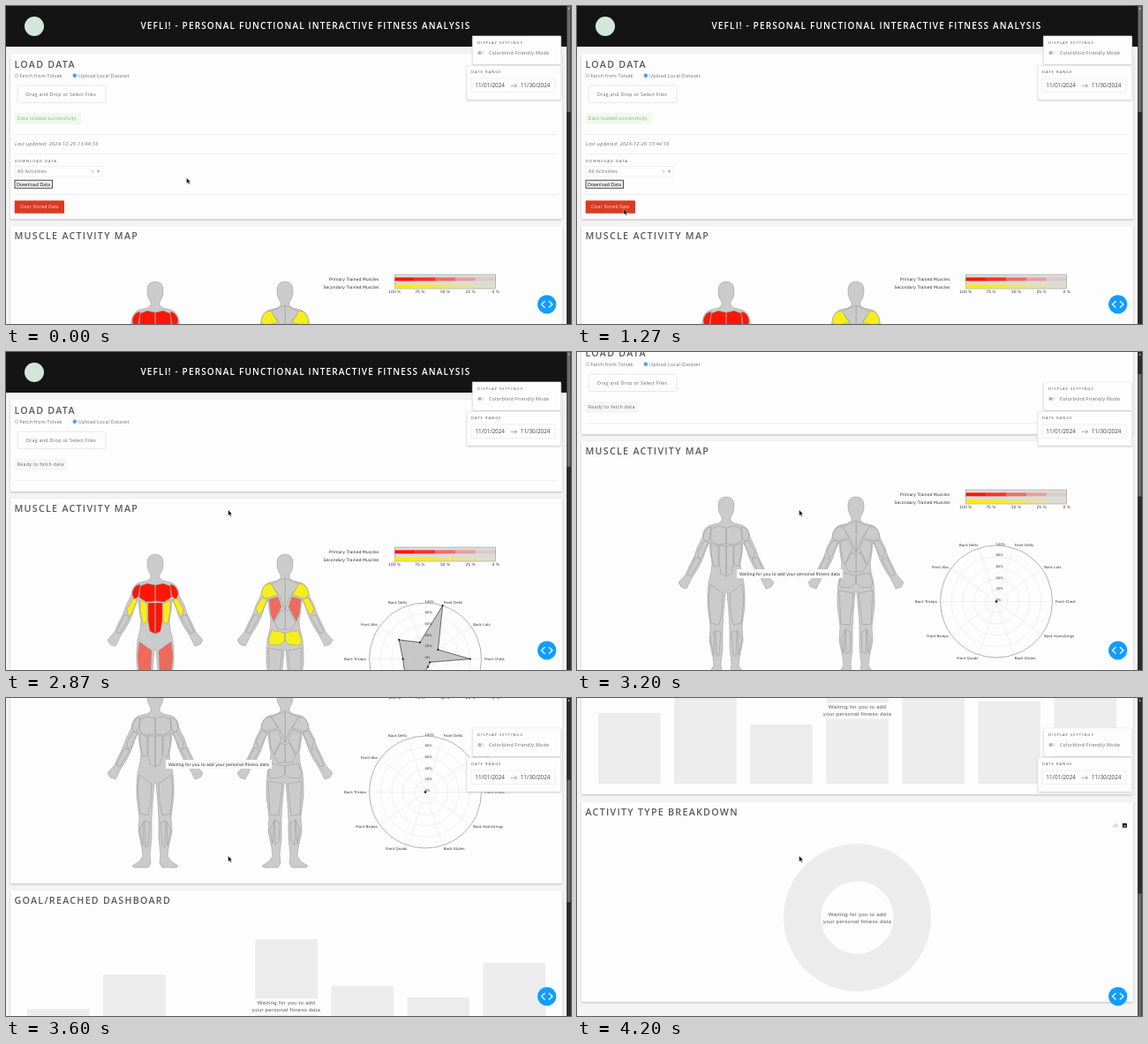
Recreate the animation shown at these times as an HTML page. Size 640x360 px, loop 4.27 s.

```html
<!DOCTYPE html>
<html lang="en">
<head>
<meta charset="utf-8">
<title>Fitness analysis</title>
<style>
html, body { margin: 0; width: 100%; height: 100%; overflow: hidden; background: #f4f4f4; }
svg { display: block; width: 100vw; height: 100vh; }
text { font: 5.3px "Open Sans", sans-serif; letter-spacing: .27px; fill: #6a6a6a; }
.h { font-size: 10.67px; font-weight: 600; letter-spacing: 1.29px; fill: #5a5a5a; }
.label { font-size: 4.15px; letter-spacing: 1px; fill: #4a4a4a; }
.date { font-size: 6.35px; letter-spacing: 0; fill: #484848; }
.wait { font: 6px "Liberation Sans", Arial, sans-serif; letter-spacing: .33px; fill: #555; text-anchor: middle; }
.plot text { font: 4px "DejaVu Sans", sans-serif; letter-spacing: 0; fill: #333; }
.plot .big { font-size: 4.65px; }
.plot .tick { font-size: 4.4px; text-anchor: middle; }
.plot .pct { font-size: 3.7px; }
.card { fill: #fdfdfd; filter: drop-shadow(0 1px 1.2px #9999); }
.line { fill: none; stroke: #e6e6e6; stroke-width: .6; }
.dash { fill: none; stroke: #c4c4c4; stroke-width: .6; stroke-dasharray: 1.5 1; }
.fill { fill: #ececec; }
.skin { fill: #cbcbcb; stroke: #929292; stroke-width: .5; stroke-linejoin: round; }
.skin .none { fill: #cbcbcb; }
.data .red { fill: #ff1505; }
.data .salmon { fill: #ee6a5c; }
.data .yellow { fill: #f6ee1c; }
</style>
</head>
<body>
<svg viewBox="0 0 640 360" preserveAspectRatio="none">
  <rect width="640" height="360" fill="#f4f4f4"/>
  <g id="page">
    <rect width="635" height="46" fill="#141414"/>
    <circle cx="32" cy="23" r="11" fill="#d3e6da"/>
    <text class="h" x="152.5" y="26" style="font-size:10px;letter-spacing:1.15px;fill:#fff">VEFLI! - PERSONAL FUNCTIONAL INTERACTIVE FITNESS ANALYSIS</text>

    <rect id="loadCard" class="card" x="5" y="54" width="625"/>
    <text class="h" x="9.5" y="69.5">LOAD DATA</text>
    <circle cx="12" cy="78.7" r="1.8" fill="#fff" stroke="#999" stroke-width=".6"/>
    <text x="15.5" y="80.6">Fetch from Tolvek</text>
    <circle cx="77.8" cy="78.7" r="2.2" fill="#1f83ea"/>
    <circle cx="77.8" cy="78.7" r="1.4" fill="none" stroke="#fff" stroke-width=".4"/>
    <text x="82" y="80.6">Upload Local Dataset</text>
    <rect class="dash" x="13" y="90" width="100" height="19.5" rx="1.5"/>
    <text x="23" y="101.7">Drag and Drop or Select Files</text>
    <path class="line" d="M10 145.5H625"/>
    <g id="loaded">
      <rect x="10" y="121" width="75" height="13" fill="#f1f9ee"/>
      <text x="12.5" y="129.4" style="fill:#6fbd62">Data loaded successfully.</text>
      <text x="10" y="158" style="font-style:italic;letter-spacing:.4px">Last updated: 2024-12-26 13:44:16</text>
      <path class="line" d="M10 167.5H625M10 213.5H625"/>
      <text class="label" x="10" y="177.4">DOWNLOAD DATA</text>
      <rect class="line" x="10" y="181.5" width="99" height="11.5"/>
      <text x="13" y="189.3">All Activities</text>
      <path d="M96.8 186l2.4 2.6m0-2.6l-2.4 2.6" stroke="#999" stroke-width=".5"/>
      <path d="M102.8 186.5h3.4l-1.7 2z" fill="#777"/>
      <rect x="10" y="197.2" width="42.5" height="9" fill="#f0f0f0" stroke="#222" stroke-width=".8"/>
      <text x="12" y="203.6" style="letter-spacing:0;fill:#111">Download Data</text>
      <rect x="9.7" y="220.3" width="56.3" height="14.5" rx=".6" fill="#dc3a22"/>
      <text x="16" y="229.3" style="font-size:4.67px;letter-spacing:.33px;fill:#fff0ee">Clear Stored Data</text>
    </g>
    <g id="ready">
      <rect x="10" y="121" width="59" height="13" fill="#f6f6f6"/>
      <text x="12.8" y="129.4">Ready to fetch data</text>
    </g>

    <g id="lower">
      <rect class="card" x="5" y="166" width="625" height="285"/>
      <text class="h" x="9.5" y="181.2">MUSCLE ACTIVITY MAP</text>
      <g id="plot" class="plot"></g>

      <rect class="card" x="5" y="459" width="625" height="226"/>
      <text class="h" x="9.5" y="474.3">GOAL/REACHED DASHBOARD</text>
      <g id="bars" class="fill"></g>
      <rect x="278" y="581.5" width="79" height="18" fill="#fdfdfd"/>
      <text class="wait" x="317.5" y="588">Waiting for you to add</text>
      <text class="wait" x="317.5" y="595.8">your personal fitness data</text>

      <rect class="card" x="5" y="693.5" width="625" height="226.5"/>
      <text class="h" x="9.5" y="708.8">ACTIVITY TYPE BREAKDOWN</text>
      <path d="M608 722.5v-3m2 3v-5m2 5v-4" stroke="#ccc" stroke-width="1.2"/>
      <rect x="617.8" y="717.8" width="5.2" height="5" rx=".6" fill="#1c1c1c"/>
      <path d="M619.2 721.8v-1.3m1.2 1.3v-2.2m1.2 2.2v-1.7" stroke="#fff" stroke-width=".5"/>
      <circle cx="317.5" cy="824.5" r="62.3" fill="none" stroke="#ececec" stroke-width="42.4"/>
      <text class="wait" x="317.5" y="822.7">Waiting for you to add</text>
      <text class="wait" x="317.5" y="830.5">your personal fitness data</text>
    </g>
  </g>

  <rect class="card" x="528.5" y="34" width="100" height="32"/>
  <rect class="line" x="528.5" y="34" width="100" height="32"/>
  <text class="label" x="534" y="42.7">DISPLAY SETTINGS</text>
  <rect x="534" y="51" width="8" height="4" rx="2" fill="#ebebeb"/>
  <circle cx="536.5" cy="53" r="2" fill="#b4b4b4"/>
  <text x="547" y="54.8" style="letter-spacing:.24px">Colorblind Friendly Mode</text>
  <rect class="card" x="522" y="67.5" width="106.5" height="38.5"/>
  <rect class="line" x="522" y="67.5" width="106.5" height="38.5"/>
  <text class="label" x="527" y="76">DATE RANGE</text>
  <rect class="line" x="527" y="82" width="95" height="15.5"/>
  <text class="date" x="531.3" y="92.3">11/01/2024</text>
  <path d="M571.5 90.3h7m-2.4-2.2l2.4 2.2l-2.4 2.2" fill="none" stroke="#777" stroke-width=".6"/>
  <text class="date" x="582.8" y="92.3">11/30/2024</text>

  <circle cx="612.7" cy="337.8" r="10.6" fill="#119dff"/>
  <path d="M610.5 334l-4 3.8l4 3.8m4.4-7.6l4 3.8l-4 3.8" fill="none" stroke="#fff" stroke-width="1.3"/>

  <rect x="635" width="5" height="360" fill="#2c2c2c"/>
  <rect id="thumb" x="635.6" width="3.8" fill="#6b6b6b"/>
  <path d="M636.2 3.6h2.6l-1.3-1.8z" fill="#d0d0d0"/>
  <path id="cursor" d="M0 0v6.4l1.5-1.3l1.1 2.3l1.1-.5l-1-2.2h2z" fill="#111" stroke="#fff" stroke-width=".35"/>
</svg>
<script>
const $ = id => document.getElementById(id);

// Half figures, mirrored about x = 0
const outline = "M0 229C6 229 9 233 9 239C9 246 7 249 5 252V256L9 259L18 261Q26 264 27 275L33 287L36 296L42 308L46 317" +
  "L54 326L51 331L45 333L42 327L39 321L32 310L27 300L23 288L19 280L18 292L16 304L17 314L20 326L21 340L21 352L18 376" +
  "L19 392L15 411L14 420L18 426L26 431L24 433H8L5 428L6 418L4 400L4 378L3 360L1 338L0 336";
const front = [
  ["red", "M.3 264L9 262L17 265L18 278L10 283L.3 282Z"],
  ["red", "M17 263Q25 264 26 274L24 280L19 277Z"],
  ["red", "M.3 284H8V304L6 316L.3 319Z"],
  ["yellow", "M9 285L17 281L17 294L14 308L9 306Z"],
  ["yellow", "M20 280L25 279L32 291L31 299L27 297Z"],
  ["none", "M29 300L35 297L44 317L40 319Z"],
  ["salmon", "M4 338L18 328L20 345L17 372L8 374L5 360Z"],
  ["none", "M6 382L12 380L11 410L8 408ZM13 381L18 390L14 408Z"]
];
const back = [
  ["none", "M0 256L5 258L16 263L6 276L0 292Z"],
  ["yellow", "M16 262Q26 263 27 275L22 279L8 275Z"],
  ["yellow", "M20 280L26 278L33 290L30 298L26 294Z"],
  ["salmon", "M8 277L18 280L16 297L13 305L7 294L4 288Z"],
  ["none", "M0 294L5 292L12 306L8 314H0Z"],
  ["none", "M29 300L35 297L44 317L40 319Z"],
  ["yellow", "M.5 318L15 315L19 326L17 332L4 331L.5 327Z"],
  ["none", "M3 338L19 335L17 373L7 374Z"],
  ["none", "M6 382L12 379L11 407L7 404ZM12 379L17 390L14 406Z"]
];
const half = parts => `<path d="${outline}"/>` + parts.map(([c, d]) => `<path class="${c}" d="${d}"/>`).join("");
const figure = (x, parts) => [1, -1].map(s =>
  `<g class="skin" transform="translate(${x}) scale(${s} 1)">${half(parts)}</g>`).join("");

// Colour scale
function legend() {
  let s = '<rect x="440.3" y="221" width="114.4" height="16" fill="#dcdcdc" stroke="#888" stroke-width=".5"/>';
  [["#ff1505", 224.3], ["#ffee00", 232.4]].forEach(([c, y]) => {
    [1, .85, .55, .3, .1].forEach((a, i) =>
      s += `<rect x="${440.5 + i * 22.8}" y="${y}" width="22.8" height="4" fill="${c}" opacity="${a}"/>`);
  });
  s += '<text class="big" x="366" y="228">Primary Trained Muscles</text><text class="big" x="359.5" y="237.2">Secondary Trained Muscles</text>';
  for (let i = 0; i < 5; i++) s += `<text class="tick" x="${440.3 + i * 28.6}" y="242.4">${100 - 25 * i} %</text>`;
  return s;
}

// Radar chart
const CX = 475, CY = 347.5, R = 63.5;
const names = ["Front Chest", "Back Lats", "Front Delts", "Back Delts", "Front Abs", "Back Triceps",
  "Front Biceps", "Front Quads", "Back Glutes", "Back Hamstrings"];
const values = [.8, .28, 1, .31, .58, .4, .45, .4, .15, .1];
const polar = (i, r) => [CX + r * Math.cos(i * Math.PI / 5), CY - r * Math.sin(i * Math.PI / 5)];

function radar() {
  let s = "";
  for (let k = 1; k < 5; k++) s += `<circle class="line" cx="${CX}" cy="${CY}" r="${R * k / 5}"/>`;
  names.forEach((_, i) => s += `<path class="line" d="M${CX} ${CY}L${polar(i, R)}"/>`);
  s += `<circle cx="${CX}" cy="${CY}" r="${R}" fill="none" stroke="#808080" stroke-width=".6"/>`;
  const pts = values.map((v, i) => polar(i, v * R));
  s += `<g id="values"><polygon points="${pts.join(" ")}" fill="#bbbc" stroke="#333" stroke-width=".7"/>` +
    pts.map(([x, y]) => `<circle cx="${x}" cy="${y}" r="1"/>`).join("") + "</g>";
  s += `<circle id="zero" cx="${CX}" cy="${CY}" r="1.2"/>`;
  for (let k = 0; k < 6; k++) s += `<text class="pct" x="474.5" y="${CY - R * k / 5 - .4}">${k * 20}%</text>`;
  names.forEach((n, i) => {
    const [x, y] = polar(i, R + 3.5);
    s += `<text x="${x}" y="${y + 1.4}" text-anchor="${x > CX ? "start" : "end"}">${n}</text>`;
  });
  return s;
}

$("plot").innerHTML = figure(169, front) + figure(316, back) + legend() + radar() +
  '<g id="empty"><rect x="181" y="311" width="120" height="10" fill="#fafafa"/>' +
  '<text class="big" x="241" y="317.7" text-anchor="middle">Waiting for you to add your personal fitness data</text></g>';
$("bars").innerHTML = [80, 119, 67, 159, 106, 93, 132].map((h, i) =>
  `<rect x="${24 + i * 86.1}" y="${673 - h}" width="70.5" height="${h}"/>`).join("");

// Keys: [ms, value...]
const scrollKeys = [[3000, 0], [3200, 65], [3600, 241], [3930, 435], [4200, 576]];
const cursorKeys = [[70, 204.5, 194.5], [900, 53, 229.8], [2000, 53, 229.8], [2730, 251.6, 178.8]];
const CLEARED = 1660, EMPTIED = 2930, LOOP = 4270;
const smooth = p => p * p * (3 - 2 * p);

function at(keys, t, ease = p => p) {
  if (t <= keys[0][0]) return keys[0].slice(1);
  const i = keys.findIndex(k => k[0] >= t);
  if (i < 0) return keys[keys.length - 1].slice(1);
  const a = keys[i - 1], b = keys[i], p = ease((t - a[0]) / (b[0] - a[0]));
  return a.slice(1).map((v, j) => v + (b[j + 1] - v) * p);
}
const show = (id, on) => $(id).setAttribute("display", on ? "inline" : "none");

function draw(now) {
  const t = Math.round(Math.floor((now % LOOP + 4) * .015) / .15) * 10;
  const cleared = t >= CLEARED, empty = t >= EMPTIED;
  const [scroll] = at(scrollKeys, t);
  const height = empty ? 936 : cleared ? 997 : 1080;
  show("loaded", !cleared);
  show("ready", cleared);
  show("values", !empty);
  show("zero", empty);
  show("empty", empty);
  $("plot").classList.toggle("data", !empty);
  $("loadCard").setAttribute("height", cleared ? 104 : 187);
  $("lower").setAttribute("transform", `translate(0 ${cleared ? 0 : 83})`);
  $("page").setAttribute("transform", `translate(0 ${-scroll})`);
  $("thumb").setAttribute("y", scroll / height * 360);
  $("thumb").setAttribute("height", 360 * 360 / height);
  $("cursor").setAttribute("transform", `translate(${at(cursorKeys, t, smooth)})`);
}
function loop() {
  draw(performance.now());
  requestAnimationFrame(loop);
}
loop();
</script>
</body>
</html>
```
